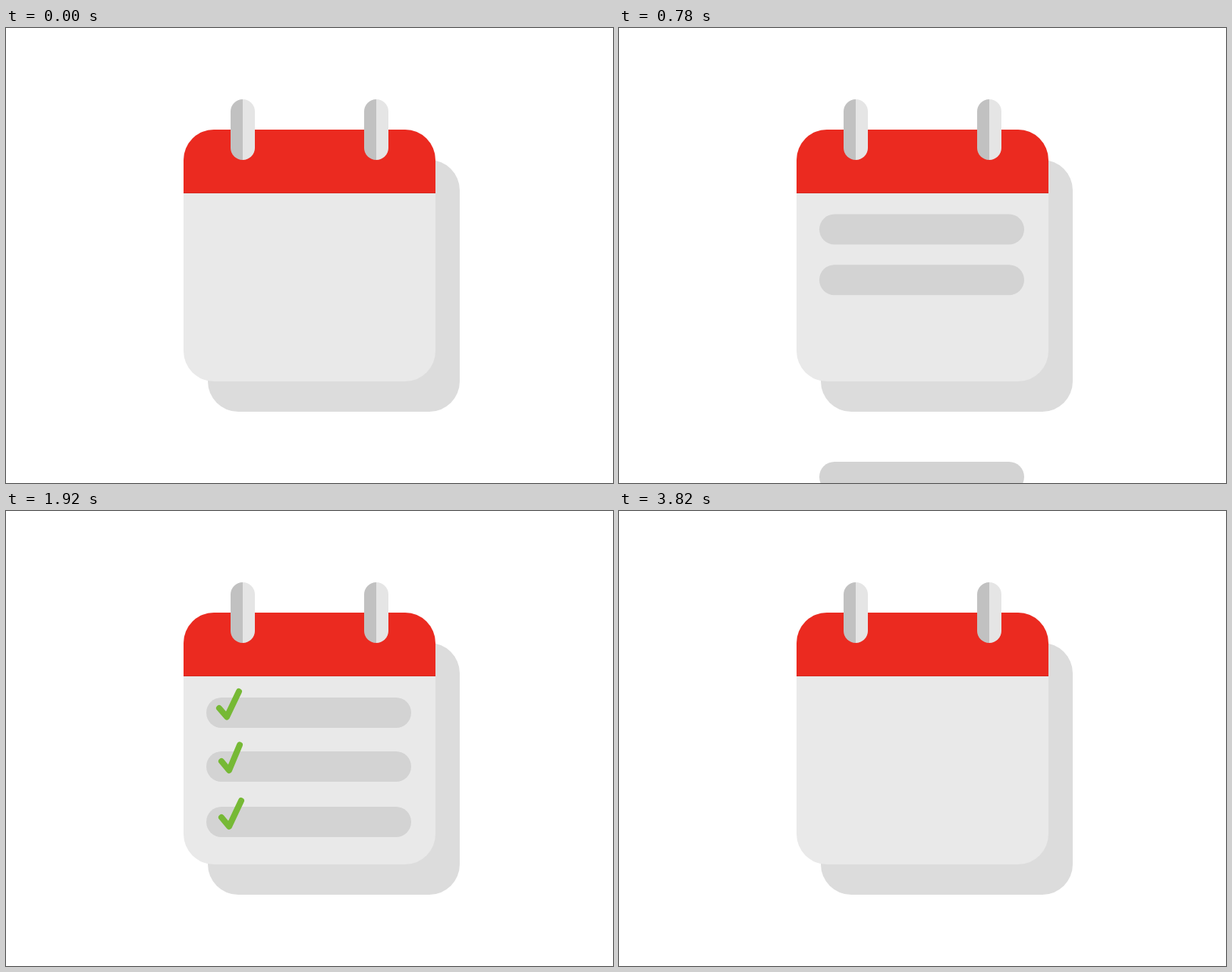
Recreate the animation shown at these times as an HTML page. Size 800 by 600 pixels, loop 4.44 s.

```html
<!DOCTYPE html>
<html lang="en">
<head>
<meta charset="utf-8">
<title>Calendar checklist</title>
<style>
  html, body { margin: 0; width: 100%; height: 100%; overflow: hidden; background: #fff; }
  svg { display: block; width: 100%; height: 100%; }
  .bar { fill: #d3d3d3; }
  .tick {
    fill: none; stroke: #76b935; stroke-width: 8;
    stroke-linecap: round; stroke-linejoin: round;
  }
</style>
</head>
<body>
<svg viewBox="0 0 800 600">
  <defs>
    <linearGradient id="metal">
      <stop offset="50%" stop-color="#c1c1c1"/>
      <stop offset="50%" stop-color="#e5e5e5"/>
    </linearGradient>
  </defs>
  <rect x="266" y="174" width="332" height="332" rx="40" fill="#dcdcdc"/>
  <rect x="234" y="134" width="332" height="332" rx="40" fill="#e9e9e9"/>
  <path d="M234 218V174a40 40 0 0 1 40-40H526a40 40 0 0 1 40 40V218Z" fill="#eb2a20"/>
  <path d="M234 217.5H566" stroke="#d3281f"/>
  <rect x="296" y="94" width="32" height="80" rx="16" fill="url(#metal)"/>
  <rect x="472" y="94" width="32" height="80" rx="16" fill="url(#metal)"/>

  <rect class="bar" x="264" width="270" height="40" rx="20"/>
  <rect class="bar" x="264" width="270" height="40" rx="20"/>
  <rect class="bar" x="264" width="270" height="40" rx="20"/>

  <path class="tick" pathLength="100" d="M281 260L291 271.5L307 238"/>
  <path class="tick" pathLength="100" d="M284 330L294 342L308 308.5"/>
  <path class="tick" pathLength="100" d="M284 404L294 416L310 382"/>
</svg>
<script>
  const LOOP = 4440, STEP = 20, STAGGER = 200;
  const LAND = 432, LEAVE = 3361.5;
  const RISE = 3.5, FALL = 3.6; // px per ms
  const TICK_TIME = 80;
  const restY = [246, 317, 390];
  const tickIn = [1540, 1700, 1840];
  const tickOut = [3400, 3480, 3560];
  const bars = document.querySelectorAll('.bar');
  const ticks = document.querySelectorAll('.tick');

  const clamp = v => Math.min(1, Math.max(0, v));

  // Straight run up from below, damped swing on landing, straight drop.
  function barOffset(t) {
    if (t > LEAVE) return (t - LEAVE) * FALL;
    const s = (t - LAND) / 1000;
    if (s < 0) return -s * 1000 * RISE;
    if (s > 0.6) return 0;
    return -67 * Math.sin(6 * Math.PI * s) * Math.exp(-10.7 * s);
  }

  function draw(t) {
    bars.forEach((bar, i) => {
      const y = restY[i] + barOffset(t - i * STAGGER);
      bar.setAttribute('y', Math.min(y, 700).toFixed(2));
    });
    ticks.forEach((tick, i) => {
      const shown = clamp((t - tickIn[i]) / TICK_TIME) - clamp((t - tickOut[i]) / TICK_TIME);
      tick.style.visibility = shown > 0 ? 'visible' : 'hidden';
      tick.style.strokeDasharray = shown < 1 ? `${shown * 100} 200` : 'none';
    });
  }

  const start = performance.now();
  function frame() {
    const t = (performance.now() - start) % LOOP;
    draw(Math.floor((t + 1) / STEP) * STEP);
    requestAnimationFrame(frame);
  }
  frame();
</script>
</body>
</html>
```
